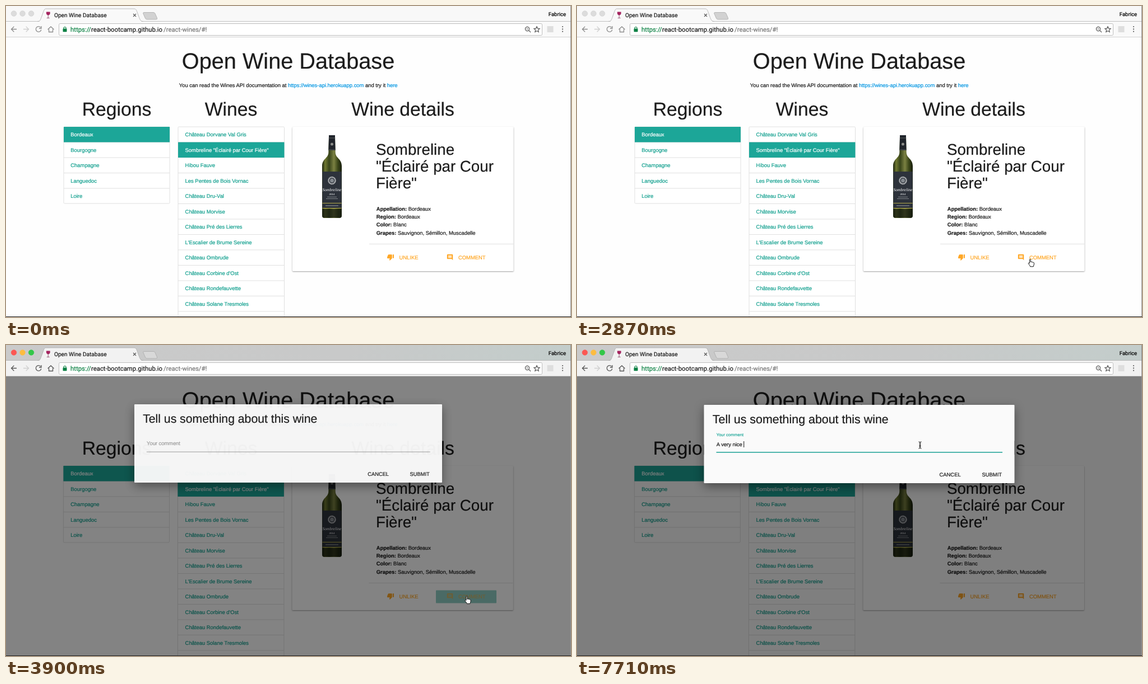
Recreate the animation shown at these times as an HTML page. Size 1008x556 px, loop 8 s.

```html
<!DOCTYPE html>
<html lang="en">
<head>
<meta charset="utf-8">
<title>Open Wine Database</title>
<style>
html, body { margin: 0; width: 100%; height: 100%; overflow: hidden; background: #fff; }
svg { display: block; width: 100vw; height: 100vh; --c: #1c1c1c; }
text { font-family: "Liberation Sans", Arial, sans-serif; font-size: 9.42px; white-space: pre; text-rendering: geometricPrecision; }
/* A hairline in the text colour gives the heavier smoothing of the screen. */
text, tspan { fill: var(--c); stroke: var(--c); stroke-width: .22px; }
.ui text { font-family: Roboto, sans-serif; }
.mid { text-anchor: middle; }
.teal { --c: #13a08f; }
.link { --c: #0396e2; }
.amber { --c: #ffa726; fill: #ffa726; }
.white { --c: #fff; }
.box { fill: #fff; stroke: #e0e0e0; }
.row { stroke: #e0e0e0; }
.icon { fill: none; stroke: var(--ink); stroke-width: 1.3; }
#card { filter: drop-shadow(0 1px 1.3px rgba(0,0,0,.38)); }
#panel { filter: drop-shadow(0 6px 9px rgba(0,0,0,.42)); }
</style>
</head>
<body>
<svg viewBox="0 0 1008 556" preserveAspectRatio="none" xmlns="http://www.w3.org/2000/svg">
  <defs>
    <linearGradient id="strip"><stop stop-color="#cacaca"/><stop offset=".6" stop-color="#c8c9c9"/><stop offset="1" stop-color="#c3cdcb"/></linearGradient>
    <linearGradient id="glass">
      <stop stop-color="#1c2410"/><stop offset=".16" stop-color="#6e7730"/><stop offset=".36" stop-color="#38441a"/>
      <stop offset=".6" stop-color="#7b8142"/><stop offset=".8" stop-color="#3c4719"/><stop offset="1" stop-color="#171d0d"/>
    </linearGradient>
    <clipPath id="btnClip"><rect x="767" y="438.500" width="108" height="23" rx="1"/></clipPath>
  </defs>

  <rect width="1008" height="556" fill="#fefefe"/>
  <g id="boxes"></g>
  <g id="page">
    <text class="mid" x="503.500" y="111.500" style="font-size:39.7px">Open Wine Database</text>
    <text class="mid" x="503.700" y="145">You can read the Wines API documentation at <tspan class="link">https://wines-api.herokuapp.com</tspan> and try it <tspan class="link">here</tspan></text>
    <g id="heads"></g>
    <g id="lists"></g>
    <g id="bottle">
      <path d="M576 231h11v4l.7 27c.2 10 11.300 11 11.300 24v89q0 4-4 4h-27q-4 0-4-4v-89c0-13 11.100-14 11.300-24l.7-27z" fill="url(#glass)"/>
      <path d="M576 231h11v4l.7 23h-12.400l.7-23z" fill="#20242b"/>
      <path d="M575.500 236h12M575.300 257h12.400" stroke="#6a6c68" stroke-width=".8"/>
      <circle cx="581.500" cy="247" r="2.500" fill="#8c8d8a"/>
      <rect x="564.500" y="296" width="34" height="66" fill="#2d323b"/>
      <path d="M564.500 363h34v12q0 3.500-3.500 3.500h-27q-3.500 0-3.500-3.500z" fill="#171c10" opacity=".75"/>
      <circle cx="581.500" cy="312" r="6" fill="none" stroke="#c4c6c8" stroke-width="2.400" stroke-dasharray="1.500 .5"/>
      <circle cx="581.500" cy="312" r="3.500" fill="#858a90"/>
      <text class="mid white" x="581.500" y="331" style="font:italic 7.500px 'Liberation Serif',serif;stroke:none">Sombreline</text>
      <text class="mid white" x="581.500" y="337.500" style="font-size:4.500px;stroke:none">2014</text>
      <path d="M573 341.500h17M571 344.500h21" stroke="#9a9da1" stroke-width=".8"/>
      <path d="M564.500 352.500h34M564.500 361.500h34" stroke="#b3a94a" stroke-width="1.200"/>
      <path d="M570 357h23" stroke="#9a9da1" stroke-width="1"/>
    </g>
    <g id="title"></g>
    <g id="facts"></g>
    <g id="unlike" class="amber">
      <path transform="translate(679.500 442.500) scale(.545)" d="M15 3H6c-.83 0-1.540.5-1.840 1.220l-3.020 7.050c-.09.23-.14.47-.14.73v2c0 1.100.9 2 2 2h6.310l-.95 4.570-.03.32c0 .41.17.79.44 1.060L9.830 23l6.590-6.590c.36-.36.58-.86.58-1.410V5c0-1.100-.9-2-2-2zm4 0v12h4V3h-4z"/>
      <text x="701.500" y="452.500">UNLIKE</text>
    </g>
    <g id="dots"><text x="661" y="423.500" font-weight="bold">...</text><text x="679.500" y="467">...</text></g>
    <g id="comment">
      <g clip-path="url(#btnClip)">
        <rect id="btnBg" x="767" y="438" width="108" height="24"/>
        <circle id="ripple" cx="822.500" cy="449.500" fill="#26a69a" opacity=".35"/>
      </g>
      <g id="btnText" class="amber">
        <path transform="translate(785.800 443) scale(.52)" d="M20 2H4c-1.100 0-2 .9-2 2v12c0 1.100.9 2 2 2h14l4 4V4c0-1.100-.9-2-2-2zm-2 12H6v-2h12v2zm0-3H6V9h12v2zm0-3H6V6h12v2z"/>
        <text x="807" y="452.500">COMMENT</text>
      </g>
    </g>
  </g>
  <rect id="shade" y="56" width="1007" height="499"/>

  <g id="dialog">
    <rect id="panel" x="226.500" y="107" width="554" height="140" rx="1" fill="#fafafa"/>
    <text x="241.800" y="140" style="font-size:21.400px">Tell us something about this wine</text>
    <text id="label">Your comment</text>
    <rect id="line" x="248.500" width="510.500"/>
    <text id="typed" x="248.800" y="180.500"></text>
    <rect id="caret" y="172" width="1" height="11" fill="#111"/>
    <text x="646.500" y="235">CANCEL</text>
    <text x="722.500" y="235">SUBMIT</text>
  </g>

  <g class="ui" id="ui">
    <rect id="bar" width="1008" height="28"/>
    <path d="M0 27.500h1008" stroke="#b4b4b4" stroke-width=".8"/>
    <rect id="tools" y="28" width="1008" height="28"/>
    <path id="tab" d="M56 28.500c5 0 5-3 7-8l4-11c1.500-4 2.500-4.500 5-4.500h156c3 0 4 1 5.500 4.500l4 11c2 5 3 8 7.500 8z"/>
    <path d="M56 27.500c5 0 5-2 7-7l4-11c1.500-4 2.500-4.500 5-4.500h156c3 0 4 1 5.500 4.500l4 11c2 5 3 7 7.500 7" fill="none" stroke="#aaa" stroke-width=".8"/>
    <path id="plus" d="M246 11.500h17q2 0 3 2l3.500 8q1 2.500-2 2.500h-16q-2 0-3-2l-3.500-8q-1-2.500 1-2.500z" stroke="#aaa" stroke-width=".8"/>
    <g id="lights"></g>
    <path d="M72 10.500h6.500c.8 4-.8 5.500-3.200 6-2.500-.5-4-2-3.300-6z" fill="#a5245f"/>
    <path d="M75.200 16v5.500M72.700 21.500h5" stroke="#98617c" stroke-width="1"/>
    <text x="86" y="20" style="font-size:10.100px">Open Wine Database</text>
    <path d="M227 14l5 5m0-5l-5 5" stroke="#555" stroke-width="1.100"/>
    <text x="999" y="17.500" text-anchor="end" style="font-size:9.500px;--c:#000">Fabrice</text>
    <path d="M0 55.500h1008" stroke="#d2d2d2"/>
    <rect x="94.500" y="31.500" width="862" height="21" rx="2" fill="#fff" stroke="#bdbdbd"/>
    <path class="icon" d="M19 41.500H9.500m4.800-4.800l-4.800 4.800 4.800 4.800"/>
    <path d="M31 41.500h9.500m-4.800-4.800l4.800 4.800-4.800 4.800" fill="none" stroke="#cfcfcf" stroke-width="1.300"/>
    <path class="icon" d="M61.800 38.300a4.800 4.800 0 1 0 1 4.200M63 36v4h-4"/>
    <path class="icon" d="M74.500 42l5.500-5 5.500 5M76.500 41.500v5h7v-5"/>
    <rect x="101.500" y="40.500" width="7" height="5.800" rx=".8" fill="#0b8043"/>
    <path d="M103 41v-1.500a2 2 0 0 1 4 0V41" fill="none" stroke="#0b8043" stroke-width="1.200"/>
    <text y="46" style="font-size:11.350px"><tspan x="115" style="--c:#0b8043">https://</tspan><tspan x="152">react-bootcamp.github.io</tspan><tspan x="281" style="--c:#777">/react-wines/#!</tspan></text>
    <g fill="none" stroke="#555" stroke-width="1.200">
      <circle cx="930" cy="41" r="3.600"/><path d="M932.700 43.700l3.300 3.300M928.300 41h3.400"/>
      <path d="M947 36.800l1.500 3.300 3.600.4-2.700 2.400.8 3.600-3.200-1.900-3.200 1.900.8-3.600-2.700-2.400 3.600-.4z"/>
    </g>
    <rect x="965.500" y="36" width="11" height="11" fill="#dedede"/>
    <path d="M993 37v9" stroke="#5a5a5a" stroke-width="2.200" stroke-linecap="round" stroke-dasharray="0 4.300"/>
  </g>
  <path d="M1007.500 0v556" stroke="#777" stroke-width=".8"/>
  <path d="M0 555.500h1008" stroke="#222"/>

  <g id="cursor">
    <path id="arrow" d="M0 0v12.800l3-2.700 2.200 4.900 2.300-1-2.200-4.700h4.200z" fill="#111" stroke="#fff" stroke-width=".9"/>
    <path id="hand" d="M2 1.200c0-1.500 2-1.500 2 0v4.300c.3-1 2-1 2.100.2.400-.8 1.900-.6 2 .5.500-.6 1.900-.4 1.900.8v2.500c0 1.800-1.200 2.200-1.200 4H3.200C3 11.500 1 10 0 8.200c-.7-1.300.7-2 2-.5z" fill="#fff" stroke="#111" stroke-width="1"/>
    <path id="beam" d="M-2.500-6q2.500 0 2.500 1.500V4.500Q0 6-2.500 6M2.500-6Q0-6 0-4.500V4.500Q0 6 2.500 6M-1.500 1.500h3" fill="none" stroke="#111" stroke-width="1"/>
  </g>
</svg>
<script>
const LOOP = 8000, ROW = 27.5, TOP = 216;
const $ = id => document.getElementById(id);
const set = (id, attrs) => { for (const k in attrs) $(id).setAttribute(k, attrs[k]); };
const show = (id, on) => set(id, { visibility: on ? "visible" : "hidden" });
const clamp = v => Math.min(1, Math.max(0, v));

const regions = ["Bordeaux", "Bourgogne", "Champagne", "Languedoc", "Loire"];
const wines = [
  "Château Dorvane Val Gris", "Sombreline \"Éclairé par Cour Fière\"", "Hibou Fauve",
  "Les Pentes de Bois Vornac", "Château Dru-Val", "Château Morvise", "Château Pré des Lierres",
  "L'Escalier de Brume Sereine", "Château Ombrude", "Château Corbine d'Ost",
  "Château Rondefauvette", "Château Solane Tresmoles"
];

function listBox(x, w, rows, active) {
  let s = `<rect class="box" x="${x}" y="${TOP}" width="${w}" height="${rows * ROW - 0.5}" rx="1.5"/>`;
  for (let i = 1; i < rows; i++) {
    const y = TOP + i * ROW;
    s += `<path class="row" d="M${x} ${y}h${w}"/>`;
  }
  return s + `<rect x="${x}" y="${TOP + active * ROW}" width="${w}" height="${ROW}" fill="#1ca698"/>`;
}
const listText = (x, items, active) => items.map((name, i) =>
  `<text class="${i === active ? "white" : "teal"}" x="${x}" y="${TOP + 17 + i * ROW}">${name}</text>`).join("");

$("boxes").innerHTML = listBox(103, 189, 5, 0) + listBox(307, 189.5, 13, 1) +
  `<rect id="card" x="511" y="216" width="394.500" rx="1.5" fill="#fff"/><path id="divider" stroke="#e0e0e0"/>`;
$("lists").innerHTML = listText(115.3, regions, 0) + listText(319.6, wines, 1);
$("heads").innerHTML = [["Regions", 197.5], ["Wines", 401.5], ["Wine details", 708]].map(([s, x]) =>
  `<text class="mid" x="${x}" y="195.500" style="font-size:33.700px">${s}</text>`).join("");
$("title").innerHTML = ["Sombreline", "\"Éclairé par Cour", "Fière\""].map((s, i) =>
  `<text x="660" y="${266 + i * 29.9}" style="font-size:27.700px">${s}</text>`).join("");
$("facts").innerHTML = [["Appellation", "Bordeaux"], ["Region", "Bordeaux"], ["Color", "Blanc"],
  ["Grapes", "Sauvignon, Sémillon, Muscadelle"]].map(([k, v], i) =>
  `<text x="660.800" y="${366.2 + i * 14.1}"><tspan font-weight="bold">${k}:</tspan> ${v}</text>`).join("");
$("lights").innerHTML = [14, 29.5, 45].map(x => `<circle cx="${x}" cy="13.500" r="4.800" stroke-width=".6"/>`).join("");

const ticks = [0];
for (const [a, b, n] of [[450, 1390, 7], [1540, 2570, 8], [2720, 3520, 6], [3690, 3690, 1], [3900, 4880, 6], [5030, 5320, 3]])
  for (let i = 0; i < n; i++) ticks.push(n > 1 ? Math.floor((a + (b - a) * i / (n - 1)) / 10) * 10 : a);
const hold = t => ticks.reduce((last, k) => k <= t ? k : last, 0);

const path = [[450, 832, 37], [1390, 792, 190], [1540, 783, 202], [1980, 759.5, 445.5], [2120, 757, 455],
  [2570, 799, 454], [3040, 819, 449], [4090, 819, 449], [4880, 612, 179]];
function cursorAt(t) {
  const i = path.findIndex(p => p[0] > t);
  if (i < 0) return path[path.length - 1].slice(1);
  if (i === 0) return path[0].slice(1);
  const [t0, x0, y0] = path[i - 1], [t1, x1, y1] = path[i], u = (t - t0) / (t1 - t0);
  return [x0 + (x1 - x0) * u, y0 + (y1 - y0) * u];
}

const COMMENT = "A very nice ";
const keys = [5620, 5920, 6068, 6216, 6360, 6510, 6660, 7110, 7110, 7260, 7560, 7710];

function drawWindow(active) {
  set("bar", { fill: active ? "url(#strip)" : "#f8f8f8" });
  for (const id of ["tools", "tab"]) set(id, { fill: active ? "#f2f2f2" : "#f9f9f9" });
  set("plus", { fill: active ? "#d8d8d8" : "#d2d2d2" });
  $("ui").style.setProperty("--ink", active ? "#555" : "#8c8c8c");
  const hues = active ? ["#fc5753", "#fdbc40", "#33c748"] : ["#dcdcdc", "#dcdcdc", "#dcdcdc"];
  [...$("lights").children].forEach((c, i) => {
    c.setAttribute("fill", hues[i]);
    c.setAttribute("stroke", active ? hues[i] : "#cbcbcb");
  });
}

function drawCard(t) {
  const loading = t >= 3690 && t < 3900, extra = loading ? 15 : 0;
  const pressed = t >= 3360 && t < 4280, filled = t >= 3690;
  set("boxes", { transform: `translate(${t >= 3690 ? -0.6 : 0} 0)` });
  set("card", { height: 258 + extra });
  set("divider", { d: `M648 ${425.5 + extra}h257` });
  show("unlike", !loading);
  show("dots", loading);
  set("comment", { transform: loading ? "translate(-49 15)" : "" });
  show("btnBg", pressed);
  set("btnBg", { fill: filled ? "#8fcdc4" : "#e2e2e2" });
  set("ripple", { r: pressed && !filled ? 5 + (t - 3360) * 0.08 : 0 });
  set("btnText", { opacity: pressed ? (filled ? 0.6 : 0.3) : 1 });
}

function drawDialog(t, now) {
  const p = 1 - (1 - clamp((t - 3669) / 335)) ** 3;
  set("shade", { opacity: 0.5 * p });
  show("dialog", p > 0);
  set("dialog", { opacity: p ** 1.3, transform: `translate(${503.5 * 0.3 * (1 - p)} ${-30 * (1 - p)}) scale(${0.7 + 0.3 * p} 1)` });

  const focus = t >= 5030, f = clamp((t - 4980) / 190);
  set("label", { transform: `translate(248.800 ${180 - 17 * f}) scale(${1 - 0.2 * f})`, style: `--c:${focus ? "#1ca698" : "#9e9e9e"}` });
  set("line", { y: focus ? 191 : 191.5, height: focus ? 1.6 : 1, fill: focus ? "#26a69a" : "#9e9e9e" });
  $("typed").textContent = COMMENT.slice(0, keys.filter(k => k <= now).length);
  set("caret", { x: 248.6 + $("typed").getComputedTextLength(), opacity: focus ? 1 : 0 });
}

function drawCursor(t) {
  const [x, y] = cursorAt(t);
  const kind = t > 4200 ? (y < 191 ? "beam" : "arrow") : (x >= 767 && y > 438 ? "hand" : "arrow");
  for (const id of ["arrow", "hand", "beam"]) show(id, t >= 450 && id === kind);
  set("cursor", { transform: `translate(${x} ${y})` });
}

function draw(now) {
  const t = hold(now);
  drawWindow(t >= 3360);
  drawCard(t);
  drawDialog(t, now);
  drawCursor(t);
}

const start = performance.now();
function frame() {
  draw((performance.now() - start) % LOOP);
  requestAnimationFrame(frame);
}
frame();
</script>
</body>
</html>
```
